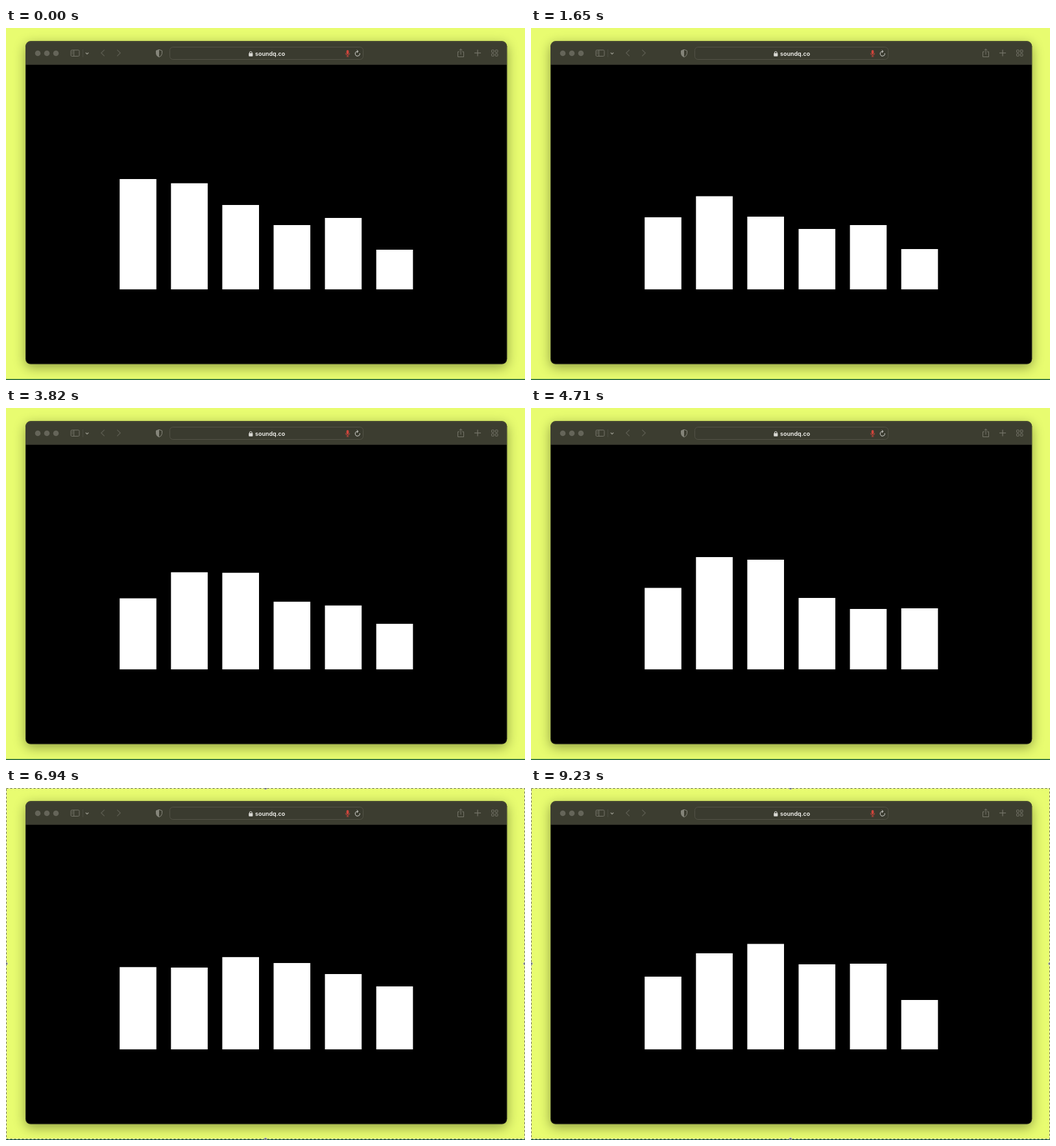
An HTML page with a canvas for the animation above (9.34 s loop, 800 by 543 pixels).

```html
<!DOCTYPE html>
<html lang="en">
<head>
<meta charset="utf-8">
<title>Sound bars</title>
<style>
  html, body { margin: 0; width: 100%; height: 100%; overflow: hidden; background: #e8fc70; }
  canvas { display: block; width: 800px; height: 543px; }
</style>
</head>
<body>
<canvas id="stage" width="800" height="543"></canvas>
<script>
const ctx = document.getElementById('stage').getContext('2d');
const LOOP = 9340, STEP = 58.75, LAST = 157, MARQUEE_AT = 5200;
const BASE = 403.2, LEFT = 175.2, PITCH = 79.1, BAR = 56.6;
const DIM = '#747468', FAINT = '#5e5e52', BRIGHT = '#d8d8d3', RED = '#d0453c';

// A few levels the bars pass through; the rest is generated between them.
const poses = [
  { at: 0, tops: [233, 239.5, 273, 304, 293, 342] },
  { at: 28, tops: [292, 259.5, 291, 310, 304, 341] },
  { at: 51, tops: [302, 290, 294, 310, 310, 364] },
  { at: 80, tops: [277.5, 230, 234, 293, 310, 309] },
  { at: 104, tops: [290, 290, 293, 285, 311, 329] },
  { at: 134, tops: [278.5, 255, 245, 284, 258.5, 288] },
  { at: LAST, tops: [291, 255, 240.5, 272, 271, 327] }
];

// Shared beat plus a smaller wobble per bar, fading out at each pose.
function wobble(step, bar) {
  const beat = Math.sin(step * 0.47);
  const own = Math.sin(step * 0.9 + bar * 2.1) + Math.sin(step * 0.61 + bar * 4.7);
  return 8 * beat + 5 * own;
}

function barTop(step, bar) {
  const next = Math.max(1, poses.findIndex(p => p.at >= step));
  const a = poses[next - 1], b = poses[next];
  const u = (step - a.at) / (b.at - a.at);
  const ease = (1 - Math.cos(Math.PI * u)) / 2;
  const level = a.tops[bar] + (b.tops[bar] - a.tops[bar]) * ease;
  return level + wobble(step, bar) * Math.sin(Math.PI * u);
}

function line(color, width, ...points) {
  ctx.beginPath();
  points.forEach(([x, y], i) => i ? ctx.lineTo(x, y) : ctx.moveTo(x, y));
  ctx.strokeStyle = color;
  ctx.lineWidth = width;
  ctx.stroke();
}

function box(x, y, w, h, r, fill, stroke) {
  ctx.beginPath();
  ctx.roundRect(x, y, w, h, r);
  if (fill) { ctx.fillStyle = fill; ctx.fill(); }
  if (stroke) { ctx.strokeStyle = stroke; ctx.lineWidth = 1; ctx.stroke(); }
}

function dot(x, y, r, color) {
  ctx.beginPath();
  ctx.arc(x, y, r, 0, Math.PI * 2);
  ctx.fillStyle = color;
  ctx.fill();
}

function arc(x, y, r, from, to, color, width = 1) {
  ctx.beginPath();
  ctx.arc(x, y, r, from, to);
  ctx.strokeStyle = color;
  ctx.lineWidth = width;
  ctx.stroke();
}

// Arrow head with its tip at x, y; dx and dy give the reach of the arms.
function chevronX(x, y, dx, dy, color, width = 1.1) {
  line(color, width, [x + dx, y - dy], [x, y], [x + dx, y + dy]);
}

function chevronY(x, y, dx, dy, color, width = 1.1) {
  line(color, width, [x - dx, y + dy], [x, y], [x + dx, y + dy]);
}

function sidebarIcon() {
  box(100, 34, 13, 9.5, 1.5, null, DIM);
  line(DIM, 1, [104.7, 34], [104.7, 43.5]);
  for (let y = 36; y <= 40; y += 2) line(DIM, 0.7, [101.2, y], [103.5, y]);
  line('#4b4b40', 1, [118.5, 33], [118.5, 45]);
  chevronY(125, 40.2, 2.2, -2.2, '#99998d');
}

function shield() {
  const outline = new Path2D('M236 33.3L240.5 35V39.3Q240.5 43 236 45Q231.5 43 231.5 39.3V35Z');
  ctx.strokeStyle = ctx.fillStyle = '#85857a';
  ctx.lineWidth = 1;
  ctx.stroke(outline);
  ctx.save();
  ctx.clip(outline);
  ctx.fillRect(231, 33, 5, 13);
  ctx.restore();
}

function addressField() {
  box(252.5, 29.5, 298, 19, 5, '#3a3b2f', '#525246');

  box(374.2, 38.8, 6.2, 5, 1, BRIGHT);
  arc(377.3, 38.2, 1.9, Math.PI, 0, BRIGHT);
  for (const x of [375.4, 379.2]) line(BRIGHT, 1, [x, 38], [x, 39]);

  ctx.font = '600 9px Inter, Arial, sans-serif';
  ctx.textAlign = 'center';
  ctx.fillStyle = '#f4f4f0';
  ctx.fillText('soundq.co', 407.1, 42.5);

  box(524.8, 34, 3.6, 6.5, 1.8, RED);
  arc(526.6, 38.8, 3.1, 0, Math.PI, RED, 0.9);
  line(RED, 0.9, [526.6, 42], [526.6, 44]);
  line(RED, 0.9, [524.8, 44], [528.4, 44]);

  arc(541.8, 39.7, 3.5, -0.2, Math.PI * 1.55, BRIGHT);
  chevronX(543, 36.2, -2.2, 2, BRIGHT, 1);
}

function rightIcons() {
  line(DIM, 1, [698.8, 36.7], [696.5, 36.7], [696.5, 44.5], [705.5, 44.5], [705.5, 36.7], [703.2, 36.7]);
  line(DIM, 1, [701, 41], [701, 32.5]);
  chevronY(701, 32.3, 2.3, 2.3, DIM, 1);
  line(DIM, 1.2, [722, 38.5], [732, 38.5]);
  line(DIM, 1.2, [727, 33.5], [727, 43.5]);
  for (const x of [748.5, 754.3])
    for (const y of [33.9, 39.6]) box(x, y, 3.7, 3.7, 0.7, null, DIM);
}

function browser() {
  ctx.fillStyle = '#e8fc70';
  ctx.fillRect(0, 0, 800, 543);
  ctx.fillStyle = '#0b5636';
  ctx.fillRect(0, 541.6, 800, 1.4);

  ctx.save();
  ctx.shadowColor = 'rgba(20, 30, 0, 0.42)';
  ctx.shadowBlur = 18;
  ctx.shadowOffsetY = 5;
  box(30, 20.3, 742.3, 498.2, 8, '#000');
  ctx.restore();

  box(30.3, 20.5, 741.7, 36.3, [8, 8, 0, 0], '#3c3d30');
  box(30.5, 20.9, 741.4, 497.2, 7.5, null, 'rgba(125, 128, 95, 0.3)');

  for (let i = 0; i < 3; i++) dot(49 + i * 14, 39, 4.3, '#656559');
  sidebarIcon();
  chevronX(146.7, 38.5, 5, 4.8, FAINT);
  chevronX(176.3, 38.5, -5, 4.8, FAINT);
  shield();
  addressField();
  rightIcons();
}

function marquee() {
  const edge = [0.5, 0.5, 799, 541];
  ctx.lineWidth = 1;
  ctx.strokeStyle = '#eff2d0';
  ctx.strokeRect(...edge);
  ctx.setLineDash([3, 3]);
  ctx.strokeStyle = '#666959';
  ctx.strokeRect(...edge);
  ctx.setLineDash([]);
  for (const [x, y] of [[400, 0.5], [0.5, 271], [799.5, 271], [400, 541.5]]) {
    dot(x, y, 2.4, '#d5d8d0');
    dot(x, y, 1.8, '#74797c');
  }
}

function draw(now) {
  const t = now % LOOP;
  const step = Math.min(LAST, Math.floor(t / STEP));
  browser();
  ctx.fillStyle = '#fff';
  for (let i = 0; i < 6; i++) {
    const y = barTop(step, i);
    ctx.fillRect(LEFT + i * PITCH, y, BAR, BASE - y);
  }
  if (t >= MARQUEE_AT) marquee();
}

const start = performance.now();
function tick() {
  draw(performance.now() - start);
  requestAnimationFrame(tick);
}
tick();
</script>
</body>
</html>
```
